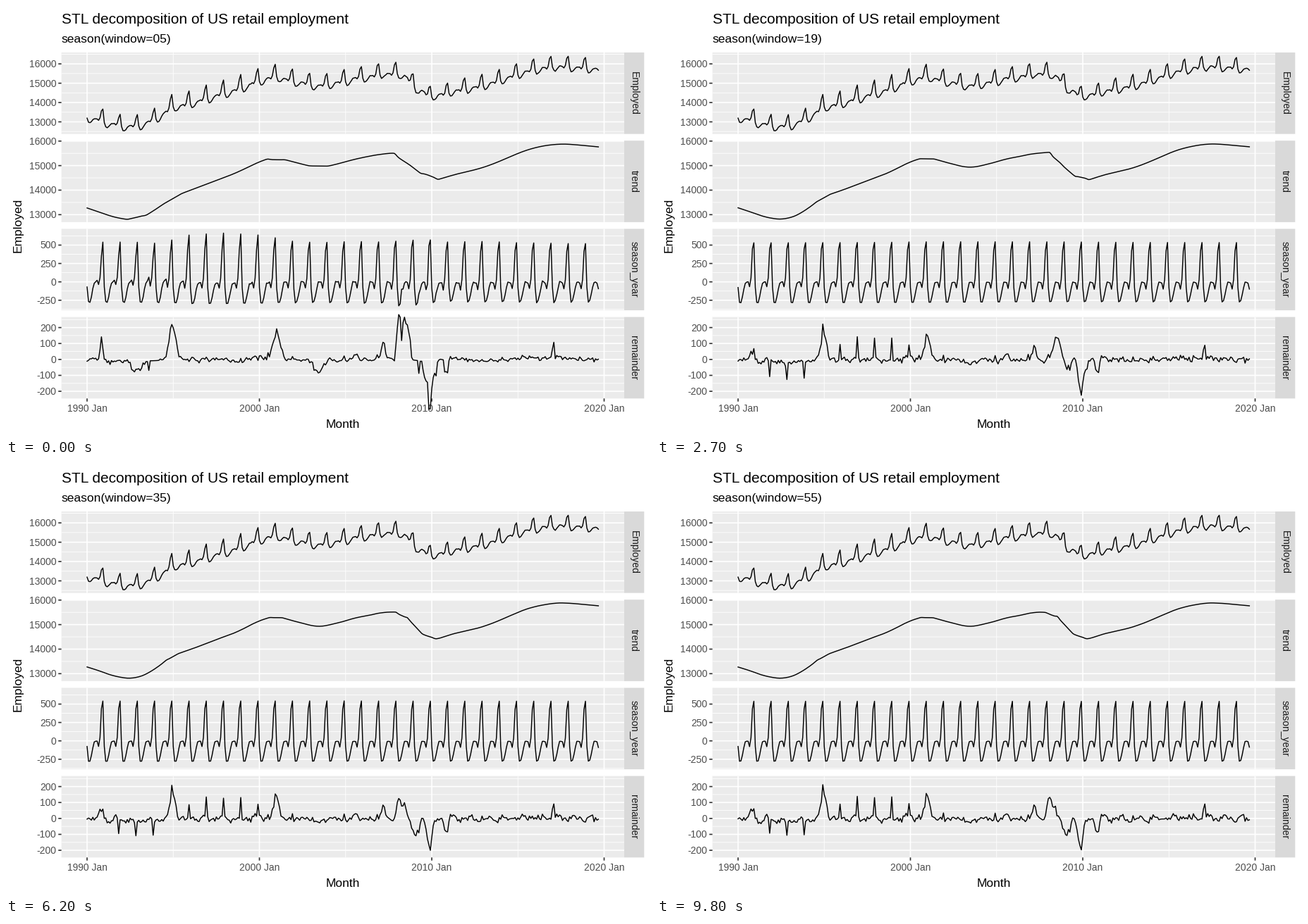
Recreate the animation shown at these times as a matplotlib script. Size 915 by 612 pixels, loop 10000 ms.

```python
import math

import matplotlib.pyplot as plt
import numpy as np
from matplotlib.animation import FuncAnimation
from matplotlib.patches import Rectangle

WIDTH, HEIGHT, DPI = 915, 612, 100
PT = 72 / DPI
PERIOD, MONTHS = 12, 357
WINDOWS = range(5, 57, 2)
LEFT, RIGHT, STRIP_RIGHT = 78.6, 877, 905.3
X_1990, PX_PER_YEAR = 115.0, 24.45

plt.rcParams["font.family"] = "Liberation Sans"

# ---------------------------------------------------------------- series

YEARS = 1990 + np.arange(MONTHS) / PERIOD

# Turning points of the long-term level.
LEVEL = [(1990, 13270), (1991, 13085), (1992.2, 12825), (1993.1, 12880),
         (1994, 13225), (1995, 13740), (1996, 13988), (1997.5, 14390),
         (1999, 14800), (2000, 15160), (2000.8, 15305), (2002, 15150),
         (2003.4, 14922), (2005, 15160), (2006.2, 15352), (2007.5, 15515),
         (2008.4, 15340), (2009.2, 14775), (2010.1, 14435), (2011.2, 14615),
         (2013, 14925), (2016, 15740), (2017, 15868), (2019.7, 15768)]

# Typical January to December shape.
PATTERN = np.array([-77, -273, -268, -200, -95, -12, -12, -13, -88, 42, 432, 540])

# Short shocks: centre, height, width in years.
SHOCKS = [(1991.3, -70, 0.2), (1995, 110, 0.13), (2001, 100, 0.18),
          (2005.55, 55, 0.12), (2007.2, 60, 0.08), (2008.05, 110, 0.12),
          (2008.55, 90, 0.18), (2009.1, -65, 0.25), (2009.86, -150, 0.13),
          (2010.86, -75, 0.1), (2017.05, 70, 0.06)]
WEAK_AUTUMNS = [(year + 0.84, -110, 0.05) for year in (1991, 1992, 1993)]


def bump(centre, height, width):
    return height * np.exp(-0.5 * ((YEARS - centre) / width)**2)


def smooth_curve(points, at):
    """Cubic Hermite curve through the points."""
    x, y = np.array(points, float).T
    slope = np.gradient(y, x)
    i = np.clip(np.searchsorted(x, at, "right") - 1, 0, len(x) - 2)
    h = x[i + 1] - x[i]
    u = (at - x[i]) / h
    bend = (1 - u) * slope[i] - u * slope[i + 1] + (2 * u - 1) * (y[i + 1] - y[i]) / h
    return y[i] + u * (y[i + 1] - y[i]) + h * u * (1 - u) * bend


def make_series():
    month = np.arange(MONTHS) % PERIOD
    span = np.linspace(-1, 1, MONTHS)
    drift = 25 * span * np.cos(2 * np.pi * (month - 3) / PERIOD)
    december = (month == 11) * (bump(1998, 130, 2) - 15 * span)
    shocks = sum(bump(*shock) for shock in SHOCKS + WEAK_AUTUMNS)
    noise = np.random.default_rng(12).normal(0, 11, MONTHS)
    return (smooth_curve(LEVEL, YEARS) + PATTERN[month] + drift + december
            + shocks + noise)


# ------------------------------------------------------ STL decomposition

class Loess:
    """Local regression on 0..n-1, evaluated from -extend to n-1+extend."""

    def __init__(self, n, window, degree, extend=0):
        self.degree = degree
        self.x = np.arange(n, dtype=float)
        self.at = np.arange(-extend, n + extend, dtype=float)[:, None]
        size = min(window, n)
        first = np.clip(self.at - (window - 1) // 2, 0, n - size)
        last = first + size - 1
        h = np.maximum(self.at - first, last - self.at) + max(0, (window - n) // 2)
        dist = np.abs(self.x - self.at)
        inside = (self.x >= first) & (self.x <= last) & (dist <= 0.999 * h)
        self.kernel = np.where(inside, (1 - np.minimum(dist / h, 1)**3)**3, 0)

    def fit(self, y, weights=None):
        w = self.kernel if weights is None else self.kernel * (weights + 1e-9)
        w = w / w.sum(axis=1, keepdims=True)
        if self.degree:
            mean = (w @ self.x)[:, None]
            offset = self.x - mean
            spread = (w * offset**2).sum(axis=1, keepdims=True)
            ok = np.sqrt(spread) > 0.001 * (len(self.x) - 1)
            tilt = np.where(ok, (self.at - mean) / np.maximum(spread, 1e-9), 0)
            w = w * (1 + tilt * offset)
        return w @ y


def moving_average(y, k):
    return np.convolve(y, np.ones(k) / k, "valid")


def next_odd(value):
    value = math.ceil(value)
    return value + 1 - value % 2


def stl(y, window, passes=16):
    """Robust decomposition into trend, season and remainder."""
    n = len(y)
    trend_fit = Loess(n, next_odd(1.5 * PERIOD / (1 - 1.5 / window)), 1)
    low_fit = Loess(n, PERIOD + 1, 1)
    cycle_fits = [Loess(len(y[m::PERIOD]), window, 0, 1) for m in range(PERIOD)]
    trend, weights = np.zeros(n), np.ones(n)
    for _ in range(passes):
        detrended = y - trend
        cycle = np.empty(n + 2 * PERIOD)
        for m, loess in enumerate(cycle_fits):
            cycle[m::PERIOD] = loess.fit(detrended[m::PERIOD], weights[m::PERIOD])
        low = moving_average(moving_average(moving_average(cycle, PERIOD), PERIOD), 3)
        season = cycle[PERIOD:-PERIOD] - low_fit.fit(low)
        trend = trend_fit.fit(y - season, weights)
        rest = y - trend - season
        ratio = np.abs(rest) / (6 * np.median(np.abs(rest)))
        weights = np.where(ratio < 0.999, (1 - np.minimum(ratio, 1)**2)**2, 0)
    return np.array([trend, season, rest])


# ----------------------------------------------------------------- stage

class Panel:
    def __init__(self, name, row, ref_a, ref_b, majors, minors):
        self.name = name
        self.top = 66 + 125.2 * row
        self.bottom = self.top + 115.7
        (self.v0, self.y0), (v1, y1) = ref_a, ref_b
        self.scale = (y1 - self.y0) / (v1 - self.v0)
        self.majors, self.minors = majors, minors

    def y(self, value):
        return self.y0 + (value - self.v0) * self.scale


PANELS = [
    Panel("Employed", 0, (16000, 82.2), (13000, 164.5),
          range(13000, 16001, 1000), range(12500, 16501, 1000)),
    Panel("trend", 1, (16000, 191.8), (13000, 296.3),
          range(13000, 16001, 1000), range(13500, 15501, 1000)),
    Panel("season_year", 2, (500, 339.5), (-250, 417.8),
          range(-250, 501, 250), range(-375, 626, 250)),
    Panel("remainder", 3, (200, 456.6), (-200, 547.1),
          range(-200, 201, 100), range(-150, 251, 100)),
]

fig = plt.figure(figsize=(WIDTH / DPI, HEIGHT / DPI), dpi=DPI, facecolor="white")
ax = fig.add_axes([0, 0, 1, 1])
ax.set(xlim=(0, WIDTH), ylim=(HEIGHT, 0))
ax.axis("off")


def box(x0, y0, x1, y1, color):
    ax.add_patch(Rectangle((x0, y0), x1 - x0, y1 - y0, fc=color, ec="none",
                           snap=False, zorder=0))


def segment(x, y, color, width):
    ax.plot(x, y, color=color, lw=width * PT, solid_capstyle="butt", snap=False, zorder=1)


def label(x, y, text, size, color="black", ha="left", rotation=0):
    return ax.text(x, y, text, fontsize=size * PT, color=color, ha=ha, va="baseline",
                   rotation=rotation, rotation_mode="anchor")


def year_x(year):
    return X_1990 + (year - 1990) * PX_PER_YEAR


THICK, THIN, TICK = 1.69, 0.85, 4.35
BIG, MEDIUM, SMALL = 20.9, 17.4, 13.93
GREY = "#4D4D4D"
DECADES = range(1990, 2021, 10)

for panel in PANELS:
    span = (panel.top, panel.bottom)
    box(LEFT, panel.top, RIGHT, panel.bottom, "#EBEBEB")
    box(RIGHT, panel.top, STRIP_RIGHT, panel.bottom, "#D9D9D9")
    for value in panel.minors:
        segment((LEFT, RIGHT), (panel.y(value),) * 2, "white", THIN)
    for year in range(1995, 2016, 10):
        segment((year_x(year),) * 2, span, "white", THIN)
    for value in panel.majors:
        y = panel.y(value)
        segment((LEFT, RIGHT), (y, y), "white", THICK)
        segment((LEFT - TICK, LEFT), (y, y), "#333333", THICK)
        label(LEFT - TICK - 2.9, y + 5, str(value), SMALL, GREY, "right")
    for year in DECADES:
        segment((year_x(year),) * 2, span, "white", THICK)
    label(886.4, sum(span) / 2, panel.name, SMALL, "#1A1A1A", "center", -90)

bottom = PANELS[-1].bottom
for year in DECADES:
    segment((year_x(year),) * 2, (bottom, bottom + TICK), "#333333", THICK)
    label(year_x(year), 575.9, f"{year} Jan", SMALL, GREY, "center")

label(LEFT, 24.8, "STL decomposition of US retail employment", BIG)
subtitle = label(LEFT, 52.3, "", MEDIUM)
label((LEFT + RIGHT) / 2, 598.8, "Month", MEDIUM, ha="center")
label(21.9, 311.7, "Employed", MEDIUM, ha="center", rotation=90)

# ------------------------------------------------------------- animation

series = make_series()
states = [stl(series, w) for w in WINDOWS]
lines = [ax.plot(year_x(YEARS), panel.y(series), color="black", lw=1.45 * PT,
                 solid_joinstyle="round", zorder=3)[0] for panel in PANELS]


def state_at(frame):
    """Index of the state shown, and whether it is halfway to the next."""
    if frame >= 97:  # the last hold is one frame shorter
        frame += 1
    return (frame + 1) // 4, (frame + 1) % 4 == 3


def update(frame):
    index, halfway = state_at(frame)
    parts = states[index]
    if halfway:
        parts = (parts + states[index + 1]) / 2
    for line, panel, part in zip(lines[1:], PANELS[1:], parts):
        line.set_ydata(panel.y(part))
    subtitle.set_text(f"season(window={WINDOWS[index]:02d})")
    return [*lines, subtitle]


animation = FuncAnimation(fig, update, frames=100, interval=100, repeat=True,
                          repeat_delay=0, blit=False)
plt.show()
```
